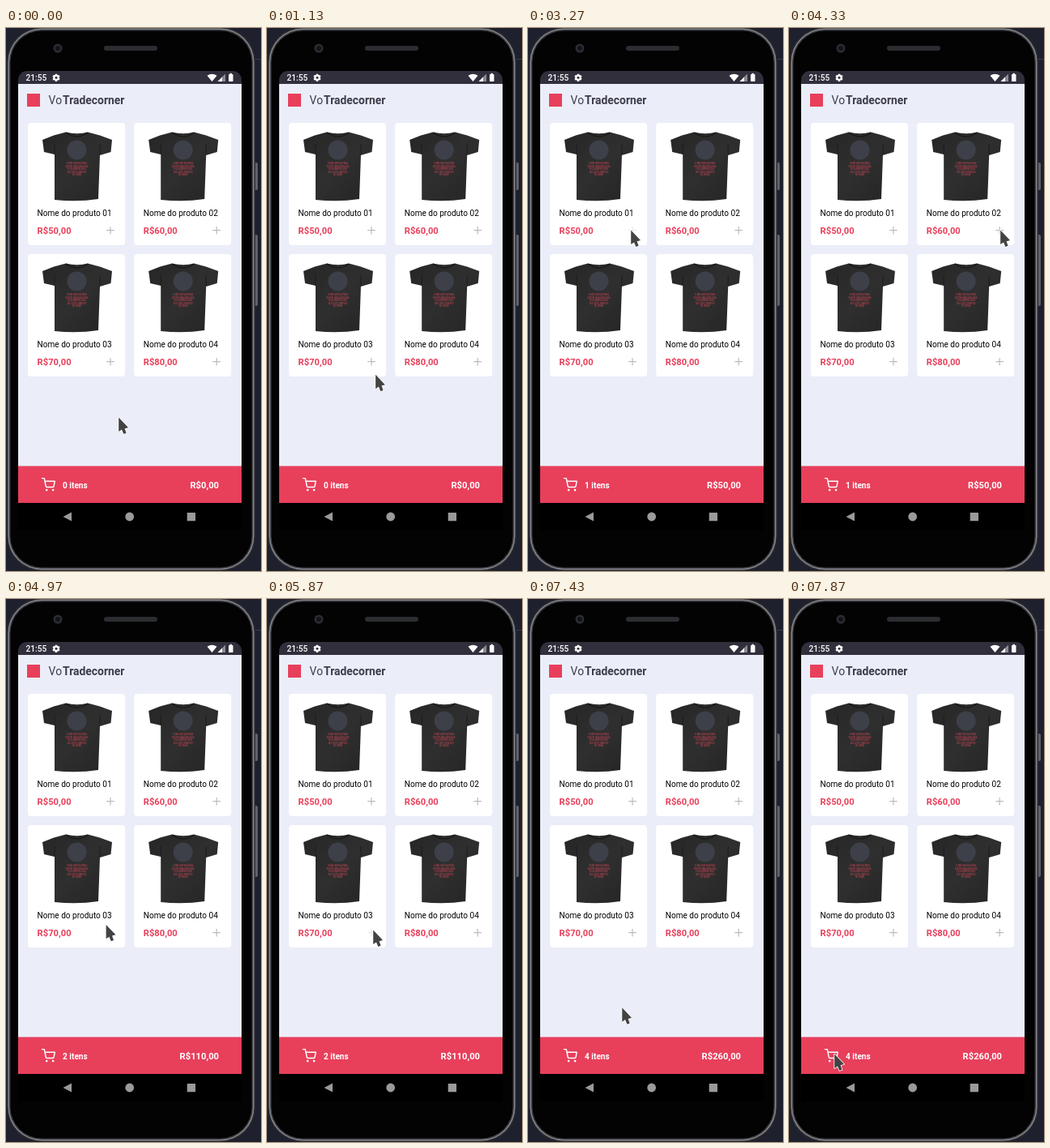
Animation of 315 by 670 pixels, one loop 8000 ms. Source, as an HTML page with a canvas:

```html
<!DOCTYPE html>
<html lang="pt-BR">
<head>
<meta charset="utf-8">
<title>Loja</title>
<style>
  html, body { margin: 0; width: 100%; height: 100%; overflow: hidden; background: #1f202e; }
  canvas { display: block; width: 315px; height: 670px; }
</style>
</head>
<body>
<canvas id="stage"></canvas>
<script>
const W = 315, H = 670, LOOP = 8000;
const RED = '#e83f5b', INK = '#3d3d4d', PAPER = '#ebeef8', GREY = '#9a9a9a';
const FONT = 'Roboto, "Liberation Sans", sans-serif';
const canvas = document.getElementById('stage');
const dpr = window.devicePixelRatio || 1;
canvas.width = W * dpr;
canvas.height = H * dpr;
const g = canvas.getContext('2d');

const COUNT_DELAY = 170, PRESS = 350;
const products = [2930, 4570, 5870, 7070].map((tap, i) => ({
  tap,
  price: 50 + i * 10,
  name: 'Nome do produto 0' + (i + 1),
  x: (i % 2) * 131.2,
  y: Math.floor(i / 2) * 162
}));

// Each move glides from the previous resting place to x, y
const moves = [
  { from: 490, to: 500, x: 136, y: 480 },
  { from: 1000, to: 2000, x: 127, y: 249 },
  { from: 3630, to: 3900, x: 205, y: 250 },
  { from: 4310, to: 4330, x: 261, y: 249 },
  { from: 4740, to: 5000, x: 121, y: 404 },
  { from: 5170, to: 5570, x: 131, y: 408 },
  { from: 6200, to: 6600, x: 257, y: 408 },
  { from: 7300, to: 7650, x: 14, y: 573 },
  { from: 7650, to: 7870, x: 56, y: 561 }
];

const clamp = k => Math.min(1, Math.max(0, k));
const easeOut = k => 1 - (1 - k) ** 1.85;

function pointerAt(t) {
  let x = 139, y = 480;
  for (const m of moves) {
    const k = easeOut(clamp((t - m.from) / (m.to - m.from)));
    x += (m.x - x) * k;
    y += (m.y - y) * k;
  }
  return [x, y];
}

function box(x, y, w, h, r, fill) {
  g.beginPath();
  g.roundRect(x, y, w, h, r);
  g.fillStyle = fill;
  g.fill();
}

function disc(x, y, r, fill) {
  g.beginPath();
  g.arc(x, y, r, 0, Math.PI * 2);
  g.fillStyle = fill;
  g.fill();
}

function shape(d, fill) {
  g.fillStyle = fill;
  g.fill(new Path2D(d));
}

function line(d, color, width) {
  g.strokeStyle = color;
  g.lineWidth = width;
  g.stroke(new Path2D(d));
}

function text(s, x, y, size, weight, color, align = 'left') {
  g.font = `${weight} ${size}px ${FONT}`;
  g.textAlign = align;
  g.fillStyle = color;
  g.fillText(s, x, y);
}

function at(x, y, scale, draw) {
  g.save();
  g.translate(x, y);
  g.scale(scale, scale);
  draw();
  g.restore();
}

function drawPhone() {
  box(0, 0, W, H, 0, '#1f202e');
  box(290, 38, 25, 1, 0, '#3b3c49');
  for (const [y, h] of [[166, 34], [255, 88]]) box(306, y, 5, h, 2, '#606167');
  // Nested outlines make the metal rim
  ['#2a2b30', '#85868a', '#3a3b40', '#030304'].forEach((c, i) =>
    box(1 + i * 1.5, i * 1.5 - 1, 307 - i * 3, 671 - i * 3, 43 - i * 1.5, c));
  disc(64, 25, 5.5, '#2c2d31');
  disc(64, 25, 3, '#11141b');
  box(121, 22, 66, 6, 3, '#2c2d31');
}

function drawStatus() {
  box(15, 53, 276, 16, [11, 11, 0, 0], '#312f3c');
  text('21:55', 24.5, 65, 10.2, 500, '#fff');
  at(62, 61.3, 1, () => {
    for (let i = 0; i < 3; i++) {
      g.rotate(Math.PI / 3);
      box(-1.3, -4.6, 2.6, 9.2, 0.5, '#fff');
    }
    disc(0, 0, 3.5, '#fff');
    disc(0, 0, 1.5, '#312f3c');
  });
  shape('M248.5 58.7Q254.5 54.6 260.5 58.7L254.5 66Z', '#fff');
  shape('M271 56.5V66H261.5Z', '#8b8a92');
  shape('M267 60.5V66H261.5Z', '#fff');
  box(275, 57, 5.5, 9, 0.8, '#fff');
  box(276.6, 55.8, 2.3, 2, 0, '#fff');
}

function drawShirt() {
  const cloth = g.createLinearGradient(45, 128, 131, 214);
  cloth.addColorStop(0, '#262626');
  cloth.addColorStop(0.5, '#2f2f2f');
  cloth.addColorStop(1, '#242424');
  shape('M74 128.5Q88 132 101 128.5L116 132.5L131 138L129.5 153L116 157L114 211Q88 215 60 212V156L47 153L45 138L59 132.5Z', cloth);
  line('M74 129Q88 139 101 129', '#171717', 1.2);
  line('M60 143V156M116 143V156', '#1c1c1c', 1);
  disc(87.5, 150.5, 12, '#3d4049');
  ['O MELHOR DIA PARA', 'VESTIR UMA IDEIA BOA', 'FICA SEMPRE AQUI', 'SEU JEITO SIMPLES', 'DE CRIAR'].forEach((s, i) =>
    text(s, 87.5, 168 + i * 3.6, 2.6, 500, '#b5414f', 'center'));
}

function drawCard(p, t) {
  at(p.x, p.y, 1, () => {
    box(27, 117, 120, 151, 4, '#fff');
    drawShirt();
    text(p.name, 38.6, 232, 10.05, 400, '#000');
    text(`R$${p.price},00`, 38.6, 254, 11.2, 700, RED);
    const pressed = t >= p.tap && t < p.tap + PRESS;
    line('M129 245V254.5M124.2 249.7H133.8', pressed ? '#e8e8ea' : '#bcbcbf', 1.2);
  });
}

function drawFooter(t) {
  const cart = products.filter(p => t >= p.tap + COUNT_DELAY);
  const total = cart.reduce((sum, p) => sum + p.price, 0);
  box(15, 540.6, 276, 45.4, 0, RED);
  at(43.7, 554.9, 0.72, () => {
    g.lineCap = g.lineJoin = 'round';
    line('M1 1h4l2.68 13.39a2 2 0 0 0 2 1.61h9.72a2 2 0 0 0 2-1.61L23 6H6', '#fff', 2);
    disc(9, 21, 1.9, '#fff');
    disc(20, 21, 1.9, '#fff');
  });
  text(cart.length + ' itens', 70, 567.5, 10.1, 700, '#fff');
  text(`R$${total},00`, 263, 568, 11.2, 700, '#fff', 'right');
}

function drawNav() {
  box(15, 586, 276, 34, 0, '#000');
  shape('M81 597.5V608.5L70.5 603Z', GREY);
  disc(152.7, 603, 5.4, GREY);
  box(223.7, 598, 10.3, 10.3, 0.5, GREY);
}

function drawPointer(t) {
  const [x, y] = pointerAt(t);
  at(x, y, 1, () => {
    const d = 'M.2 .6V18L4 15.4L6.4 21L9.6 19.8L7.6 14.2L12 13Z';
    g.lineJoin = 'round';
    line(d, '#fff', 1.6);
    shape(d, '#434343');
  });
}

function draw(t) {
  g.setTransform(dpr, 0, 0, dpr, 0, 0);
  drawPhone();
  box(15, 69, 276, 473, 0, PAPER);
  drawStatus();
  box(26, 81, 16, 16, 0, RED);
  text('Vo', 52.6, 94, 13.9, 400, INK);
  text('Tradecorner', 70, 94, 13.9, 700, INK);
  products.forEach(p => drawCard(p, t));
  drawFooter(t);
  drawNav();
  drawPointer(t);
}

const start = performance.now();
function tick() {
  draw((performance.now() - start) % LOOP);
  requestAnimationFrame(tick);
}
tick();
</script>
</body>
</html>
```
